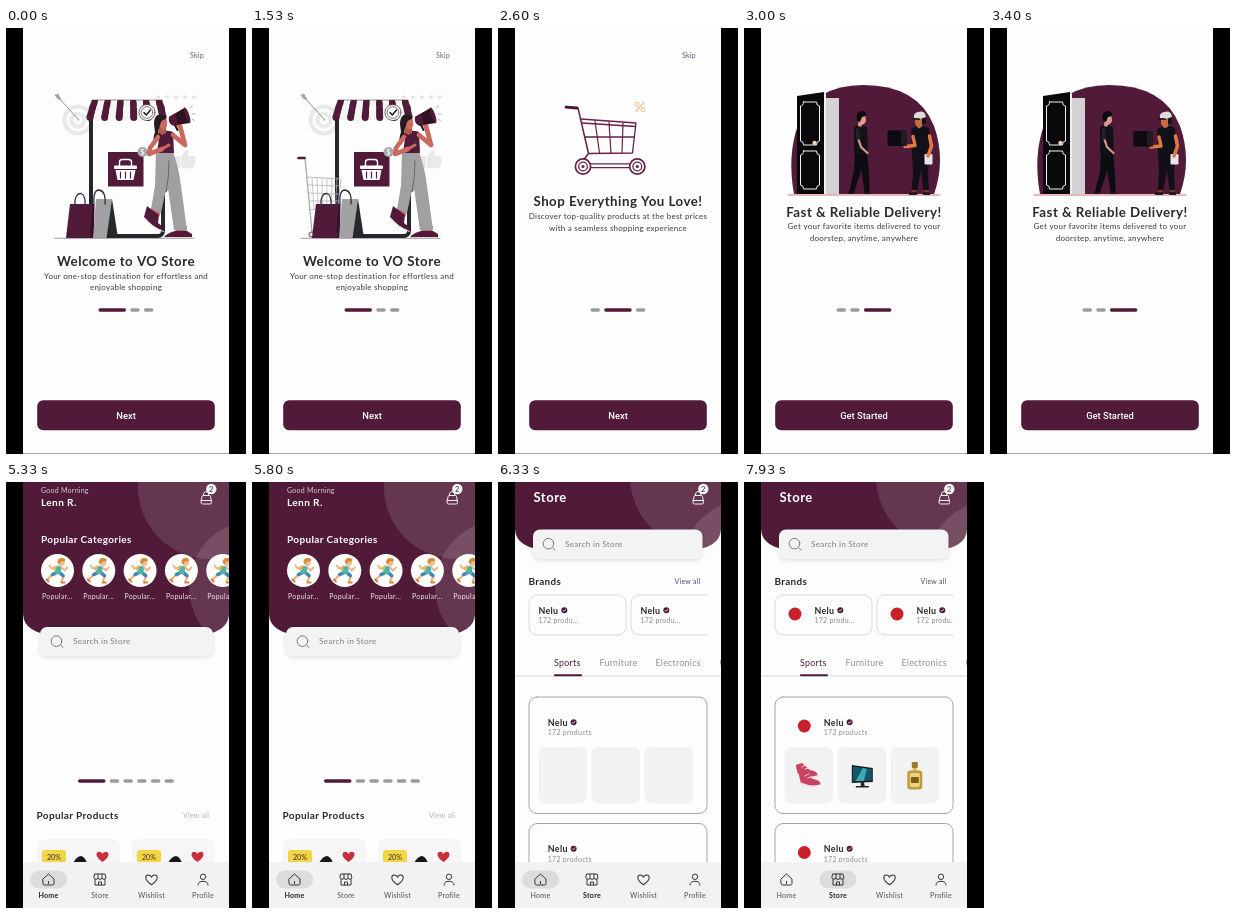
An HTML page with a canvas for the animation above (8 s loop, 240 by 426 pixels).

```html
<!DOCTYPE html>
<html lang="en">
<head>
<meta charset="utf-8">
<title>Shopping app tour</title>
<style>
html, body { margin: 0; width: 100%; height: 100%; overflow: hidden; background: #000; }
canvas { display: block; width: 240px; height: 426px; }
</style>
</head>
<body>
<canvas id="stage"></canvas>
<script>
const W = 240, H = 426, LOOP = 8000;
const canvas = document.getElementById('stage');
const ctx = canvas.getContext('2d');
const dpr = window.devicePixelRatio || 1;
canvas.width = W * dpr;
canvas.height = H * dpr;

const PLUM = '#501a38', INK = '#29292c', GREY = '#9b9b9b', PAPER = '#fdfdfd';
const SANS = 'Lato, "Open Sans", sans-serif';
const CUT = { cart: 2200, delivery: 2870, home: 5320, store: 6320 };

const clamp = v => Math.max(0, Math.min(1, v));
const ramp = (t, from, span) => clamp((t - from) / span);
const easeOut = v => 1 - (1 - v) ** 3;

function fill(d, color) {
  ctx.fillStyle = color;
  ctx.fill(new Path2D(d));
}
function stroke(d, color, width = 1) {
  ctx.strokeStyle = color;
  ctx.lineWidth = width;
  ctx.lineCap = ctx.lineJoin = 'round';
  ctx.stroke(new Path2D(d));
}
function disc(x, y, r, color, ring, width = 1) {
  ctx.beginPath();
  ctx.arc(x, y, r, 0, 7);
  if (color) { ctx.fillStyle = color; ctx.fill(); }
  if (ring) { ctx.strokeStyle = ring; ctx.lineWidth = width; ctx.stroke(); }
}
function box(x, y, w, h, r, color, edge, width = 1) {
  ctx.beginPath();
  ctx.roundRect(x, y, w, h, r);
  if (color) { ctx.fillStyle = color; ctx.fill(); }
  if (edge) { ctx.strokeStyle = edge; ctx.lineWidth = width; ctx.stroke(); }
}
function text(s, x, y, size, color, { bold = false, align = 'left', space = bold ? size * 0.036 : 0.25 } = {}) {
  ctx.font = `${bold ? 700 : 400} ${size}px ${SANS}`;
  ctx.letterSpacing = space + 'px';
  ctx.textAlign = align;
  ctx.fillStyle = color;
  ctx.fillText(s, x, y);
}
function at(x, y, draw, alpha = 1, scale = 1) {
  ctx.save();
  ctx.translate(x, y);
  ctx.scale(scale, scale);
  ctx.globalAlpha *= alpha;
  draw();
  ctx.restore();
}

// ---------- tour pages ----------

function dots(x, y, count, active) {
  for (let i = 0; i < count; i++) {
    const w = i === active ? 27.5 : 9.5;
    box(x, y - 1.7, w, 3.4, 1.7, i === active ? PLUM : GREY);
    x += w + 4.2;
  }
}

function tourPage(page, y, title, lines, label) {
  const mid = { align: 'center' };
  text(title, 120, y + 0.7, 13.3, INK, { bold: true, align: 'center' });
  lines.forEach((s, i) => text(s, 120, y + 13.4 + i * 11.5, 8, '#3c3c40', mid));
  dots(92.5, 282, 3, page);
  box(31.2, 372.2, 177.6, 30, 6, PLUM);
  ctx.font = '500 9.4px Roboto, Inter, sans-serif';
  ctx.letterSpacing = '0px';
  ctx.textAlign = 'center';
  ctx.fillStyle = '#fff';
  ctx.fillText(label, 120, 390.5);
  if (page < 2) text('Skip', 184, 30, 7, page ? '#5f4fa0' : '#65616e');
  box(17, 425, 206, 1, 0, '#a8a8a8');
}

function trolley() {
  stroke('M47 130H53L60 204H87', '#a9a9ab', 1.3);
  stroke('M46.5 130H52.5', PLUM, 2.6);
  stroke('M55 149L89 151L86 178L58 182M56 157L88 158M57 165L87 166M58 173L86 173', '#b2b2b4', 0.8);
  for (let i = 0; i < 6; i++) stroke(`M${60 + i * 5} 150L${62 + i * 4.3} 181`, '#b2b2b4', 0.7);
  disc(59.5, 206.5, 2.4, '#eee', '#777', 1.2);
  disc(85, 206.5, 2.4, '#eee', '#777', 1.2);
}

function awning() {
  const n = 11, topW = 70 / n, lowW = 80 / n;
  for (let i = 0; i < n; i++) {
    const top = 86 + i * topW, low = 80.5 + i * lowW;
    fill(`M${top} 72H${top + topW}L${low + lowW} 89Q${low + lowW} 93 ${low + lowW / 2} 93Q${low} 93 ${low} 89Z`,
      i % 2 ? '#f6f4f5' : PLUM);
  }
  stroke('M80.5 89L86 72H156L160.500 89', '#3a2431', 0.5);
}

function shopper() {
  const skin = '#c96a5f', cloth = '#a0a0a2';
  // trousers, seam, shoes
  fill('M168 198L181 198L180 204H170Z', skin);
  fill('M146 179L155 183L153 189L143 184Z', skin);
  fill('M150 124H167Q173 140 175 158L181 202H168L162 160L159 166L155 185L145 181L149 158Z', cloth);
  stroke('M163 133Q163 150 160 164L162 161', '#4c4c50', 0.7);
  fill('M141 178L153 187L152 195Q158 199 158 203Q147 200 138 189Z', PLUM);
  stroke('M138.5 190Q147 200 157.500 203.500', '#e7e0e3', 1);
  fill('M169 203H181L186 206V209.500H158Q159 206 169 203Z', PLUM);
  stroke('M158.500 209.500H185.500', '#e7e0e3', 0.9);
  // torso, head, braid
  fill('M152 105Q159 101 167 104L168 125H150Q154 114 152 105Z', PLUM);
  fill('M153 97H160V105L156 107L152 104Z', '#b3584f');
  fill('M153 90Q160 87 161 93Q162 101 157 102L153 99Z', skin);
  fill('M148 96Q148 86 155 86.500Q161 87 160 91Q154 92 154 98L152 103Q153 112 149 117Q146 112 149 104Z', '#261a20');
  // arms
  stroke('M152 109L144 120L143 126L156 121', skin, 4.6);
  stroke('M156 121L163 117', skin, 3);
  stroke('M167 107L179 117L174 98', skin, 4.8);
  stroke('M174 98L171 96', skin, 3.6);
  // megaphone
  fill('M163 89L179 79.500L184 95L167 97.500Q162 95 163 89Z', '#2f1122');
  fill('M163 89L169 85.500L172 97L167 97.500Q162 95 163 89Z', PLUM);
  ctx.beginPath();
  ctx.ellipse(181.2, 87.2, 2, 8.2, -0.33, 0, 7);
  ctx.fillStyle = '#4b1e37';
  ctx.fill();
  stroke('M169 97L171.500 102', '#27131e', 2);
  stroke('M184 80L186.500 77.500M186 86H189M186 91L188.500 92.500', '#a98d9b', 0.7);
}

function welcome(t) {
  const soft = '#e9e9ea';
  for (const r of [13.5, 6.5]) disc(72, 92, r, null, soft, 4.2);
  disc(72, 92, 2, soft);
  stroke('M51 68L72.500 91.500', '#77777a', 0.8);
  fill('M48.500 67L52 65.500L55.500 71.500L52 71.500Z', '#a4a4a7');
  for (let i = 0; i < 5; i++) {
    let d = '';
    for (let k = 0; k < 10; k++) {
      const r = k % 2 ? 1.3 : 2.9, a = k * Math.PI / 5 - Math.PI / 2;
      d += `${k ? 'L' : 'M'}${152 + i * 9 + r * Math.cos(a)} ${69 + r * Math.sin(a)}`;
    }
    fill(d + 'Z', '#e4e4e5');
  }
  fill('M169 128H174V140H169ZM175 129L180 122Q184 121 182 128H189Q191 132 188 139Q182 142 175 139Z', soft);

  stroke('M49 210.3H188', '#77777a', 0.7);
  box(85, 76, 72, 132, 5, PAPER, '#24282d', 4);
  awning();
  disc(141, 84.5, 8, '#fff', '#2c2329', 0.7);
  disc(141, 84.5, 5.8, null, '#2c2329', 0.6);
  stroke('M138 84.500L140.300 87L144.500 82', '#222226', 1.6);
  box(102, 124, 35.5, 34.5, 0.5, PLUM);
  stroke('M113.500 138V134Q113.500 131.500 116.500 131.500H122.500Q125.500 131.500 125.500 134V138', '#fff', 1.4);
  box(108, 137.5, 23, 3.5, 1, '#fff');
  fill('M109.500 142H129.500L127.500 152H111.500Z', '#fff');
  for (const x of [114.5, 119.5, 124.5]) stroke(`M${x} 144V150`, PLUM, 1.2);

  const v = easeOut(ramp(t, 70, 700));
  if (v) at(-15 * (1 - v), 0, trolley, v);

  fill('M64 176H88L84 210H60Z', PLUM);
  fill('M86.500 176H88.500L88 210H84Z', '#371126');
  stroke('M69 180Q68 165 75 165.500Q80 167 79 180', '#33303a', 1.3);
  fill('M90 171H106L101 210H87Z', '#a2a2a4');
  fill('M106 171L112 210H100.500Z', '#25282d');
  stroke('M88 176Q87 162 93 162Q100 163 99 176', '#33303a', 1.3);

  disc(136.5, 124, 5, '#a8a8aa');
  text('$', 136.5, 126.7, 7.5, '#f4f4f4', { bold: true, align: 'center' });
  shopper();
  tourPage(0, 237.4, 'Welcome to VO Store',
    ['Your one-stop destination for effortless and', 'enjoyable shopping'], 'Next');
}

function everything(t) {
  const c = '#6a2047';
  at(0, 0.5 * Math.sin((t - 2600) / 130), () => {
    stroke('M80 80L90.5 125.5L85.5 132', c, 1.5);
    stroke('M68 79.2L79 80', '#4c1231', 2.8);
    stroke('M83 91L138 95L134.5 125L90.5 125.5M84 95L137.5 98.5M87 109H136', c, 1.3);
    stroke('M97 93L101.5 125M111 94L113 125M125 95L124 125', c, 1.2);
  });
  stroke('M85 135.8H139M85 139.6H139', c, 1.2);
  for (const x of [85, 139.3]) {
    disc(x, 138.5, 7.6, PAPER, c, 1.7);
    disc(x, 138.5, 4.4, '#fff', c, 1.3);
    disc(x, 138.5, 1.6, c);
  }
  at(142, 79, () => {
    stroke('M4 -4.5L-4 4.5', '#edbf95', 1.2);
    disc(-3, -2.8, 1.9, null, '#edbf95', 1.1);
    disc(3, 2.8, 1.9, null, '#edbf95', 1.1);
  }, ramp(t, 2350, 200));
  tourPage(1, 177.6, 'Shop Everything You Love!',
    ['Discover top-quality products at the best prices', 'with a seamless shopping experience'], 'Next');
}

function doorPanel(y, h) {
  stroke(`M59.5 ${y}H72.5Q72.5 ${y + 4} 75.5 ${y + 4}V${y + h - 4}Q72.5 ${y + h - 4} 72.5 ${y + h}` +
    `H59.5Q59.5 ${y + h - 4} 56.5 ${y + h - 4}V${y + 4}Q59.5 ${y + 4} 59.5 ${y}Z`, '#f0f0f0', 1);
}

function delivery(t) {
  fill('M50 166Q43 128 54 97Q70 57 119 57Q174 57 190 98Q202 132 190 166Z', PLUM);
  stroke('M44 167H196', '#e0a3a8', 1.3);
  fill('M81 70H95V166H81Z', '#d2d2d4');
  fill('M80 64L82 66V166H80Z', '#f0f0f0');
  fill('M53 68L80 64V166H53Z', '#09090b');
  doorPanel(74, 43);
  doorPanel(123, 38);
  disc(70.5, 115, 2.2, '#ecd3c4');

  // customer
  fill('M111 124H123L125 145L125.500 164H120.500L117.500 142L110 164H105L110 143Z', '#0d0c10');
  fill('M104 163L110 164V166H104ZM120 163L127 165V166H120Z', '#171318');
  fill('M110 99Q116 95 123 99L124 126H110Z', '#121116');
  stroke('M114 110L117 119L123.500 125', '#d99a8d', 2.2);
  stroke('M113.500 102L114 110', '#24222a', 3.6);
  fill('M115 88H121.500L122 93Q120 97 117.500 97V99L114 98Z', '#dd9d8e');
  fill('M113 93Q111 84 117 83Q123 83 122 88L118 89L116 94Z', '#0b0a0d');

  // courier
  fill('M168 125H185L184 146L185 164H179.500L177 142L173 164H167.500L169 145Z', '#130f16');
  fill('M165 164H173V167H165ZM179 164H186V167H179Z', '#2b1920');
  stroke('M168 163H172.500M180 163H184.500', '#d96a4c', 1.2);
  fill('M167 101Q176 95 185 100L187 127H168Z', '#121017');
  fill('M171 91H179V97Q177 101 174 100L171 96Z', '#c46c42');
  fill('M178 87Q183 88 182 95L178 97Z', '#17131a');
  fill('M170 90Q169 85 174 84Q181 82 182 89L176 91Z', '#dedbdd');
  fill('M169 90L176 90.500V92L168 91.500Z', '#17131a');
  box(180.5, 126, 8, 10.5, 1, '#e6e6e9');
  stroke('M185.500 108L187.500 118L184 128', '#e07a42', 3.6);
  at(0, 0.5 * Math.sin((t - 3400) / 240), () => {
    stroke('M169 109L171 118L161 119', '#e07a42', 3.4);
    box(143.5, 103, 19.5, 15.5, 1, '#0c0b0f');
    fill('M157 103H163V118.500L157 117Z', '#201c24');
  });
  tourPage(2, 188, 'Fast & Reliable Delivery!',
    ['Get your favorite items delivered to your', 'doorstep, anytime, anywhere'], 'Get Started');
}

// ---------- shop ----------

function header(bottom, circleY, lowerY) {
  ctx.save();
  ctx.clip(new Path2D(`M17 0H223V${bottom - 21}Q222 ${bottom - 1} 190 ${bottom}H50Q18 ${bottom - 1} 17 ${bottom - 21}Z`));
  box(17, 0, 206, bottom, 0, PLUM);
  disc(204, circleY, 72, 'rgba(255,255,255,.12)');
  disc(250, lowerY, 67, 'rgba(255,255,255,.12)');
  ctx.restore();
  stroke('M196 14.500Q196 13.500 197 13.500H203.500Q204.500 13.500 204.500 14.500L205.500 20.500Q205.500 22 204 22H196.500Q195 22 195 20.500Z' +
    'M197.500 13V12Q198 9.500 200 9.500Q203 9.500 203 13M195 18.500H205.500', '#f5eff2', 1);
  disc(205.3, 7, 5.2, '#f8f4f5');
  text('2', 205.3, 9.7, 7.5, INK, { align: 'center', space: 0 });
}

function searchBar(x, y, w) {
  ctx.save();
  ctx.shadowColor = 'rgba(0,0,0,.14)';
  ctx.shadowBlur = 4 * dpr;
  ctx.shadowOffsetY = dpr;
  box(x, y, w, 29.5, 7, '#f3f3f3');
  ctx.restore();
  disc(50.5, y + 14.2, 5.3, null, '#77777a', 1);
  stroke(`M55 ${y + 18.7}L57 ${y + 20.5}`, '#77777a', 1);
  text('Search in Store', 67, y + 17, 8.2, '#808084');
}

function heart(x, y, s, color, edge) {
  const d = 'M0 5C-4 2 -6 0 -6 -2.500C-6 -6 -1.500 -6 0 -3C1.500 -6 6 -6 6 -2.500C6 0 4 2 0 5Z';
  at(x, y, () => edge ? stroke(d, edge, 1.1) : fill(d, color), 1, s);
}

const icons = [
  () => stroke('M-5.500 -0.500L0 -5.500L5.500 -0.500V4Q5.500 5.500 4 5.500H-4Q-5.500 5.500 -5.500 4ZM0 2V4', '#36363a', 1),
  () => stroke('M-5 -5.500H5L6 -1.500Q4 1 2 -1Q0 1 -2 -1Q-4 1 -6 -1.500ZM-5 0V5.500H5V0M-2 -5.500V-1M2 -5.500V-1M-1.500 5.500V2.500H1.500V5.500', '#36363a', 1),
  () => heart(0, 0.5, 0.95, null, '#36363a'),
  () => { disc(0, -2.7, 2.7, null, '#36363a', 1); stroke('M-5 5.500Q-5 1.800 0 1.800Q5 1.800 5 5.500', '#36363a', 1); }
];

function navBar(active, pills) {
  box(17, 380, 206, 46, 0, '#f2f2f2');
  ['Home', 'Store', 'Wishlist', 'Profile'].forEach((label, i) => {
    const x = 42.5 + i * 51.5, { alpha = 0, width = 1 } = pills[i] || {};
    if (alpha) at(x, 397.5, () => box(-18.5 * width, -9, 37 * width, 18, 9, '#dcdcdc'), alpha);
    at(x, 397.5, icons[i]);
    text(label, x, 415.5, 7.1, i === active ? '#28282b' : '#505054', { bold: i === active, align: 'center' });
  });
}

function runner() {
  stroke('M-1 3L-6 5L-10 9M2 3L6 6L4 11', '#efb183', 2.2);
  stroke('M-1 2L-5 4M2 2L5.500 5', '#3d86b8', 3.6);
  stroke('M-11 9L-9 11M4 12H7', '#d0803b', 2);
  fill('M-2 -5L4 -4L3 4L-3 3Z', '#4fb2ad');
  stroke('M-1 -4L-6 -2L-8 -5M4 -3L7 0L10 -3', '#efb183', 1.8);
  fill('M-2 -4L-5 -2L-4 0L-1 -1Z', '#e9bc3e');
  disc(4, -8, 3.4, '#f3bd93');
  fill('M0 -8Q0 -13 5 -12.500Q9 -12 7 -9Q3 -10 2 -6Z', '#d68b35');
}

function home() {
  header(153, 5, 105);
  text('Good Morning', 35, 11, 7, '#ded0d7');
  text('Lenn R.', 35, 24, 10.1, '#fff', { bold: true });
  text('Popular Categories', 35, 60.5, 10, '#fff', { bold: true });
  ctx.save();
  ctx.beginPath();
  ctx.rect(17, 60, 206, 70);
  ctx.clip();
  for (let i = 0; i < 5; i++) {
    const x = 51.5 + i * 41.3;
    disc(x, 88.5, 16.5, '#fdfdfb');
    at(x, 88.5, runner);
    text('Popular...', x - 15.5, 116.5, 7, '#eee4e9');
  }
  ctx.restore();
  searchBar(34, 145, 173);
  dots(72, 299, 6, 0);
  text('Popular Products', 30.5, 336.5, 10, INK, { bold: true });
  text('View all', 177, 335.5, 7, '#b4b4b7');
  for (const x of [31, 126]) {
    box(x, 357, 83, 60, 8, '#f6f6f6');
    box(x + 5, 368, 24, 13, 3, '#f4d443');
    text('20%', x + 17, 377.5, 7.2, '#33302a', { align: 'center', space: 0 });
    fill(`M${x + 36} 381Q${x + 40} 374 ${x + 44} 374Q${x + 48} 375 ${x + 50} 381Z`, '#17171a');
    heart(x + 65.5, 375, 1, '#c72f3c');
  }
  navBar(0, [{ alpha: 1 }]);
}

function brand(x, y, loaded, label, pad) {
  const left = x + pad + 30 * (loaded > 0);
  if (loaded) at(x + pad + 10.5, y + 0.5, () => disc(0, 0, 6.5, '#c9202c'), loaded);
  text('Nelu', left, y, 8.9, INK, { bold: true });
  disc(left + 25.8, y - 3.2, 3, PLUM);
  stroke(`M${left + 24.5} ${y - 3.2}L${left + 25.5} ${y - 2.1}L${left + 27.2} ${y - 4.3}`, '#fff', 0.7);
  text(label, left, y + 9.7, 7, '#8c8c90');
}

const goods = [
  () => {
    for (const [x, y] of [[-2, -6], [1, 3]]) {
      at(x, y, () => {
        fill('M-11 -5L-5 -7L3 0Q11 1 11 6Q3 9 -9 4Z', '#c94362');
        stroke('M-10 4Q2 9 11 6', '#f1e4e6', 1.4);
        stroke('M-5 -3L-1 -5M-2 -1L2 -2', '#f4cfd6', 1);
      });
    }
  },
  () => {
    fill('M-10 -11L11 -8V6L-10 7Z', '#15191d');
    fill('M-9 -9.500L10 -7V4.500L-9 5.500Z', '#14576b');
    fill('M-6 5L1 -8L5 -7L2 5Z', '#3cabb2');
    fill('M-1 6H2L3 10H7V11.500H-6V10H-1Z', '#222529');
  },
  () => {
    box(-3, -14, 6, 6, 1, '#a07b24');
    box(-2, -8, 4, 3, 0, '#dcbd62');
    box(-7.5, -5.5, 15, 19, 3, '#c39a35');
    box(-5, -3, 10, 14, 2, '#ead28b');
    box(-4, 1, 8, 6, 1, '#7d5e1d');
  }
];

function store(t) {
  const logos = ramp(t, 6600, 350), photos = ramp(t, 6800, 450);
  header(68, -5, 85);
  text('Store', 35.5, 20.2, 13.1, '#fff', { bold: true });
  searchBar(35, 47.5, 169.5);
  text('Brands', 30.5, 103, 9.9, INK, { bold: true });
  text('View all', 176.5, 102, 7, logos ? '#505056' : '#61448b');

  ctx.save();
  ctx.beginPath();
  ctx.rect(30, 112, 179.5, 43);
  ctx.clip();
  for (const x of [31, 133]) {
    box(x, 113, 97, 40, 8, null, '#d9d9db');
    brand(x, 131.5, logos, '172 produ...', 9.5);
  }
  ctx.restore();

  stroke('M17 194H223', '#d7d7da', 1);
  stroke('M57 193.2H83', PLUM, 2);
  text('Sports', 56, 183.5, 8.9, PLUM);
  text('Furniture', 101.5, 183.5, 8.9, '#929296');
  text('Electronics', 157.5, 183.5, 8.9, '#929296');
  text('C', 221.5, 183.5, 8.9, '#929296');

  for (const y of [215, 341.5]) {
    box(31, y, 178, 116.5, 8, null, '#a4a7a5');
    brand(31, y + 28.5, logos, '172 products', 18.8);
    goods.forEach((draw, i) => {
      const x = 40.5 + i * 53;
      box(x, y + 50, 48.5, 56.5, 7, '#f2f2f2');
      if (photos) at(x + 24.3, y + 79, draw, photos);
    });
  }
  const grow = easeOut(ramp(t, 6360, 450));
  navBar(1, [{ alpha: 1 - ramp(t, 6360, 200) }, { alpha: ramp(t, 6360, 150), width: grow }]);
}

// ---------- loop ----------

function draw() {
  const t = performance.now() % LOOP;
  ctx.setTransform(dpr, 0, 0, dpr, 0, 0);
  box(0, 0, W, H, 0, '#000');
  box(17, 0, 206, H, 0, PAPER);
  ctx.save();
  ctx.beginPath();
  ctx.rect(17, 0, 206, H);
  ctx.clip();
  if (t < CUT.cart) welcome(t);
  else if (t < CUT.delivery) everything(t);
  else if (t < CUT.home) delivery(t);
  else if (t < CUT.store) home();
  else store(t);
  ctx.restore();
  requestAnimationFrame(draw);
}
draw();
</script>
</body>
</html>
```
